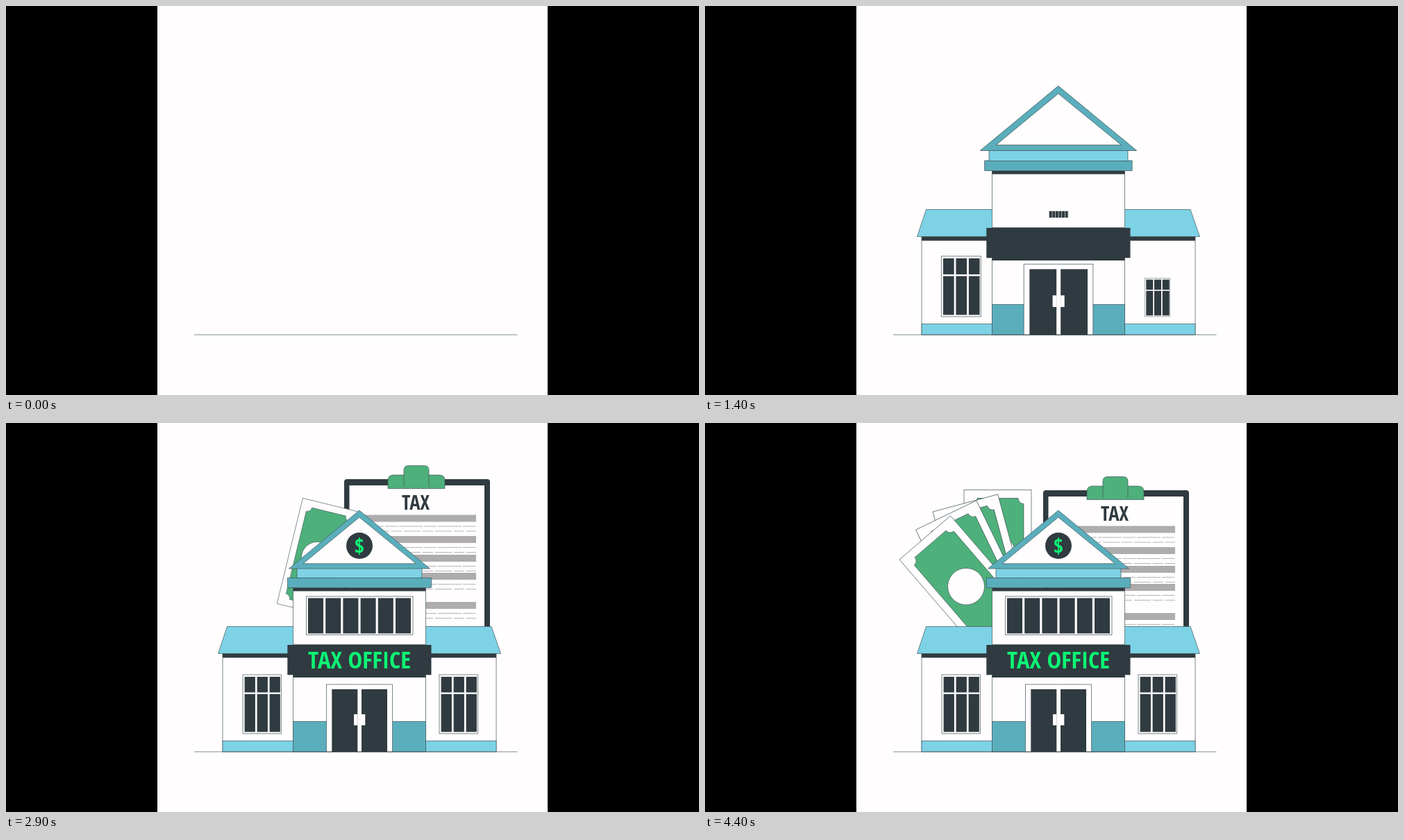
These frames come from a looping animation (998 px wide and 561 px high, 5 s). An HTML page:

```html
<!DOCTYPE html>
<html lang="en">
<head>
<meta charset="utf-8">
<title>Tax office</title>
<style>
  html, body { margin: 0; width: 100%; height: 100%; overflow: hidden; background: #000; }
  svg { display: block; width: 100%; height: 100%; }
  text {
    font-family: "Open Sans Condensed", "Noto Sans ExtraCondensed", "Open Sans", "Noto Sans", sans-serif;
    font-weight: 700; font-stretch: 62.5%; text-anchor: middle;
  }
  .edge { stroke: #43555b; stroke-width: .7; }
  .dark { fill: #2f3b40; }
  .teal { fill: #5aaebc; }
  .sky { fill: #7dd2e6; }
  .white { fill: #fffdfe; }
  .green { fill: #4eb07b; }
  .neon { fill: #0cf574; }
  .bar { fill: #aeacad; }
  .rule { stroke: #b5b3b4; stroke-width: 1; }
</style>
</head>
<body>
<svg id="stage" viewBox="0 0 998 561" preserveAspectRatio="none"></svg>
<script>
const stage = document.getElementById('stage');
const LOOP = 5000, STEP = 100, LAST = 4400;

const rect = (x, y, w, h, cls, extra = '') =>
  `<rect x="${x}" y="${y}" width="${w}" height="${h}" class="${cls}" ${extra}/>`;
const poly = (points, cls) => `<polygon points="${points}" class="${cls}"/>`;
const path = (d, cls) => `<path d="${d}" class="${cls}"/>`;
const group = (id, body) => `<g id="${id}">${body}</g>`;
const repeat = (n, draw) => Array.from({ length: n }, (_, i) => draw(i)).join('');

function sideWindow(x) {
  return rect(x, 363, 55.5, 85, 'white edge') +
    repeat(3, i => rect(x + 2.6 + i * 18, 366, 15.3, 22.5, 'dark') +
                   rect(x + 2.6 + i * 18, 391, 15.3, 54.5, 'dark'));
}

function clipboard() {
  const bars = [148.5, 179, 206, 232, 274, 316];
  const lines = bars.map(y =>
    rect(510, y, 167, 10, 'bar') +
    `<path d="M510 ${y + 16.5}H677" class="rule" stroke-dasharray="34 2 18 2"/>` +
    `<path d="M510 ${y + 23.5}H677" class="rule" stroke-dasharray="15 3 24 3"/>`).join('');
  return rect(487, 97, 210, 300, 'dark', 'rx="4"') +
    rect(494.5, 106, 194.5, 283, 'white') + lines +
    path('M550 110.500V99q0-8 8-8h15v-7q0-6.500 6.500-6.500h23q6.500 0 6.500 6.500v7h15q8 0 8 8v11.500z', 'green edge') +
    '<path d="M573 91v17M609 91v17" class="edge" fill="none"/>' +
    '<text id="heading" x="590" y="141" class="dark">TAX</text>';
}

const note = rect(0, 0, 97, 184, 'white edge') +
  path('M19 12H78a8 8 0 0 0 8 8V164a8 8 0 0 0-8 8H19a8 8 0 0 0-8-8V20a8 8 0 0 0 8-8z', 'green edge') +
  '<circle cx="47.500" cy="92" r="26.500" class="white edge"/>';

// Resting corner and tilt of each note, back to front; turn is the swing still to go at the start.
const notes = [
  { x: 373, y: 96.5, tilt: 0, turn: 43, pivot: [471, 296] },
  { x: 328, y: 128, tilt: -15, turn: 57, pivot: [470, 300] },
  { x: 303.5, y: 154, tilt: -25.8, turn: 45, pivot: [460, 312] },
  { x: 280, y: 197, tilt: -40.7, pivot: [465, 275] }
];

// Building parts that pop up: start time and anchor point.
const pops = {
  wings: [20, 509, 474],
  block: [160, 509, 474],
  sign: [350, 509, 367],
  cornice: [563, 509, 238],
  gable: [776, 509, 223.5],
  door: [1040, 509, 474],
  windowLeft: [1055, 368.7, 448],
  windowRight: [1210, 651.5, 448],
  windowTop: [1350, 509.2, 305.5],
  title: [1610, 509, 354],
  coin: [1880, 509, 177]
};

stage.innerHTML =
  rect(218, 0, 562, 561, 'white') +
  '<path d="M271 474.200H736.500" stroke="#9aa3a6" stroke-width="1.200"/>' +
  group('clipboard', clipboard()) +
  notes.map((_, i) => group('note' + i, note)).join('') +
  group('wings',
    rect(312, 332.5, 394, 141.5, 'white edge') +
    rect(312, 458.5, 394, 15.5, 'sky edge') +
    rect(312, 332.5, 394, 6, 'dark') +
    poly('318.500,293.500 699,293.500 712.500,332.500 305.500,332.500', 'sky edge')) +
  group('block',
    rect(413.5, 238, 191, 236, 'white edge') +
    rect(413.5, 238, 191, 4.5, 'dark') +
    '<path d="M413.500 319.500h191" class="edge"/>' +
    rect(413.5, 430.3, 191, 43.7, 'teal edge')) +
  group('cornice', rect(405.3, 223.3, 207.2, 14.2, 'teal edge')) +
  group('gable',
    rect(419, 209.5, 180, 14, 'sky edge') +
    poly('508.800,126 407.500,210 610.500,210', 'teal edge') +
    poly('508.800,136 428,202.800 590.500,202.800', 'white edge')) +
  group('door',
    rect(461.5, 377, 95, 97, 'white edge') +
    rect(469.3, 384, 37, 90, 'dark') + rect(512, 384, 37, 90, 'dark') +
    rect(501, 420, 5.3, 16, 'white') + rect(512, 420, 5.3, 16, 'white')) +
  group('windowLeft', sideWindow(341)) +
  group('windowRight', sideWindow(624)) +
  group('windowTop',
    rect(432.5, 250, 153.5, 55.5, 'white edge') +
    repeat(6, i => rect(435 + i * 25.2, 252.5, 22, 51, 'dark'))) +
  group('sign',
    rect(405.3, 320, 207.2, 43.3, 'dark') + rect(413.5, 363, 191, 4, 'dark')) +
  group('title', '<text id="name" x="509" y="354" class="neon">TAX OFFICE</text>') +
  group('coin',
    '<circle cx="509" cy="177" r="19" class="dark"/>' +
    '<text x="509" y="188" font-size="30" class="neon">$</text>');

const part = id => document.getElementById(id);

// Largest natural type size, up to max, that stays within the room.
function fitType(id, room, max) {
  const text = part(id);
  text.style.fontSize = max + 'px';
  const size = Math.min(max, max * room / text.getComputedTextLength());
  text.style.fontSize = size + 'px';
}
fitType('name', 148, 38);
fitType('heading', 40, 31);

const clamp = v => Math.max(0, Math.min(1, v));
const smooth = u => u * u * (3 - 2 * u);

// Grows past full size, then relaxes.
function pop(age) {
  const peak = 1.16, rise = 500, settle = 400;
  if (age <= 0) return 0;
  if (age < rise) return peak * Math.sin(age / rise * Math.PI / 2);
  return peak - (peak - 1) * clamp((age - rise) / settle);
}

function along(t, keys) {
  let value = keys[0][1];
  for (let i = 1; i < keys.length; i++) {
    const [t0, a] = keys[i - 1], [t1, b] = keys[i];
    if (t >= t0) value = a + (b - a) * smooth(clamp((t - t0) / (t1 - t0)));
  }
  return value;
}

const drop = [[2250, -400], [2520, 28], [2860, -18.6], [3030, 0]];

function place(id, scale, x, y, rest = '') {
  const el = part(id);
  el.style.display = scale > 0 ? '' : 'none';
  el.setAttribute('transform', `translate(${x} ${y}) scale(${scale}) ${rest}`);
}

function placeNote(n, i, t) {
  let scale, turn;
  if (n.turn) {
    scale = clamp((t - 3050) / 300);
    turn = n.turn * (1 - clamp((t - 3050) / 900)) ** 2;
  } else {
    scale = pop(t - 2638);
    turn = Math.max(0, 0.16 * (3240 - t));
  }
  const [px, py] = n.pivot;
  place('note' + i, scale, px, py,
    `rotate(${turn}) translate(${n.x - px} ${n.y - py}) rotate(${n.tilt})`);
}

function render(t) {
  for (const [id, [start, x, y]] of Object.entries(pops))
    place(id, pop(t - start), x, y, `translate(${-x} ${-y})`);
  part('clipboard').setAttribute('transform', `translate(0 ${along(t, drop)})`);
  notes.forEach((n, i) => placeNote(n, i, t));
}

const begin = performance.now();
function tick() {
  const t = (performance.now() - begin) % LOOP;
  render(Math.min(LAST, Math.floor(t / STEP) * STEP));
  requestAnimationFrame(tick);
}
tick();
</script>
</body>
</html>
```
